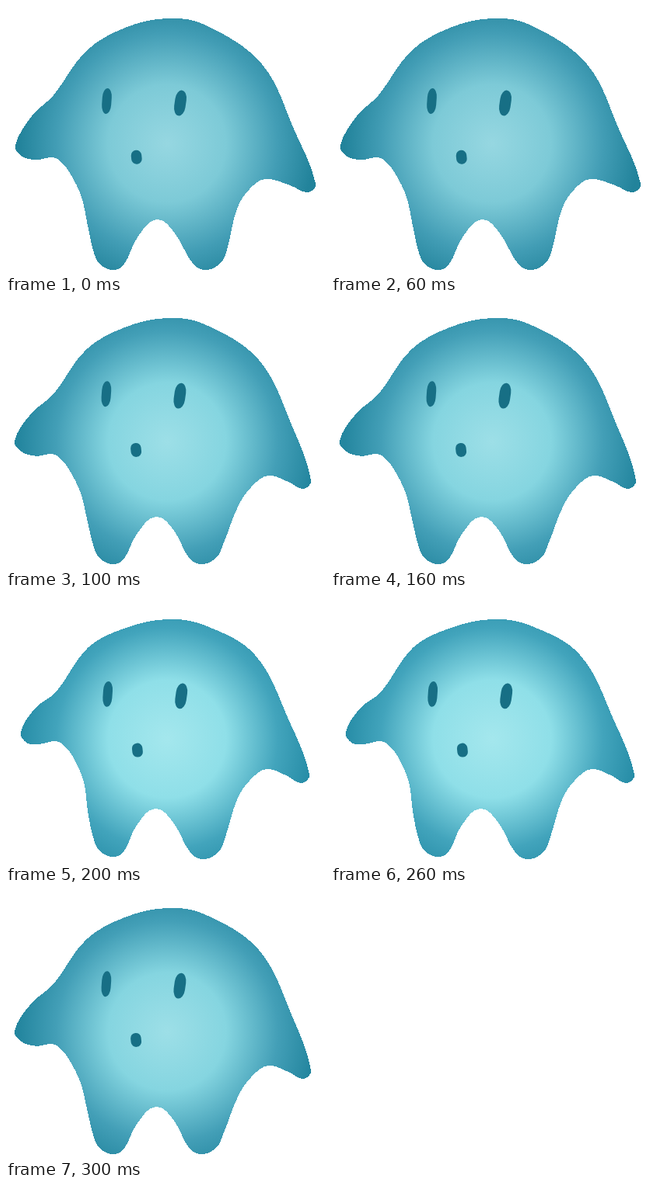
These frames come from a looping animation (410x344 px, 0.4 s). An HTML page:

```html
<!DOCTYPE html>
<html lang="en">
<head>
<meta charset="utf-8">
<title>Breathing blob</title>
<style>
  html, body { margin: 0; width: 100%; height: 100%; overflow: hidden; background: #fff; }
  svg { display: block; width: 410px; height: 344px; }
  .face { fill: #176f85; filter: blur(0.5px); }
</style>
</head>
<body>
<svg id="stage" viewBox="0 0 410 344"></svg>
<script>
const STEP = 100;
const ORDER = [0, 1, 2, 1];

// Key points of the resting body, clockwise from the top of the head.
const BODY = `207,16 255,24 329,75 371,161 398,229 388,240 365,231 333,223 313,236 297,261
  284,314 276,331 258,340 241,333 217,293 194,275 169,298 151,334 137,340 121,333 113,318
  105,283 97,246 82,215 70,200 60,195 40,198 21,194 12,180 33,142 61,115 103,58 153,28`
  .split(/\s+/).map(p => p.split(',').map(Number));

// Each joint pulls the outline near it; shift holds its offset per pose.
const joints = [
  { name: 'head',          at: [207, 16],  shift: [[0, 0], [0, 6], [0, 14]] },
  { name: 'rightShoulder', at: [350, 112], shift: [[0, 0], [-4, 1], [-9, 1]] },
  { name: 'rightHand',     at: [394, 236], shift: [[0, 0], [-6, 2], [-8, 1]] },
  { name: 'rightArmpit',   at: [333, 223], shift: [[0, 0], [4, 2], [2, 0]] },
  { name: 'rightFoot',     at: [258, 340], shift: [[0, 0], [-5, -1], [-3, -1]] },
  { name: 'crotch',        at: [194, 275], shift: [[0, 0], [-1, 3], [-2, -1]] },
  { name: 'leftFoot',      at: [137, 340], shift: [[0, 0], [0, -1], [0, -4]] },
  { name: 'leftArmpit',    at: [60, 195],  shift: [[0, 0], [-1, 2], [4, -8]] },
  { name: 'leftHand',      at: [12, 180],  shift: [[0, 0], [-1, 0], [7, -4]] },
  { name: 'leftShoulder',  at: [61, 115],  shift: [[0, 0], [0, 5], [3, 9]] }
];

const poses = [
  { face: [0, 0],       glowY: 177, skin: ['#96d7e1', '#7dcad7', '#429db5', '#22839b'] },
  { face: [-0.6, -2.8], glowY: 181, skin: ['#9ddfe7', '#85d5e0', '#439fb7', '#24869f'] },
  { face: [1.2, 3.9],   glowY: 184, skin: ['#a4e7ed', '#8fdfe8', '#42a4bc', '#268ca6'] }
];
const SKIN_STOPS = [0, 0.4, 0.75, 1];

// Moves a point by the joints' shifts, weighted by closeness.
function warp([x, y], pose) {
  let sum = 0, dx = 0, dy = 0;
  for (const { at, shift } of joints) {
    const weight = ((x - at[0]) ** 2 + (y - at[1]) ** 2 + 50) ** -2;
    sum += weight;
    dx += weight * shift[pose][0];
    dy += weight * shift[pose][1];
  }
  return [x + dx / sum, y + dy / sum];
}

// Closed spline: tangents follow the neighbours, handles scale with each span.
function smoothPath(pts) {
  const at = i => pts[(i + pts.length) % pts.length];
  const tangent = i => {
    const [a, b] = [at(i - 1), at(i + 1)];
    const length = Math.hypot(b[0] - a[0], b[1] - a[1]);
    return [(b[0] - a[0]) / length, (b[1] - a[1]) / length];
  };
  const handle = (i, reach) => at(i).map((v, k) => v + tangent(i)[k] * reach);
  const curves = pts.map((p, i) => {
    const next = at(i + 1);
    const reach = Math.hypot(next[0] - p[0], next[1] - p[1]) * 0.35;
    return `C${handle(i, reach)} ${handle(i + 1, -reach)} ${next}`;
  });
  return `M${pts[0]}${curves.join('')}Z`;
}

function pill(x, y, w, h, tilt) {
  return `<rect x="${x - w / 2}" y="${y - h / 2}" width="${w}" height="${h}"
    rx="${w / 2}" ry="${h * 0.36}" transform="rotate(${tilt} ${x} ${y})"/>`;
}

const FACE = pill(129.5, 122.5, 12, 33, 4) + pill(224, 125, 14.5, 33, 8)
  + pill(167.7, 194.7, 13.5, 18, -6);

function drawPose({ face, glowY, skin }, i) {
  const stops = skin.map((c, k) => `<stop offset="${SKIN_STOPS[k]}" stop-color="${c}"/>`);
  return `<g>
    <radialGradient id="skin${i}" gradientUnits="userSpaceOnUse"
      cx="207" cy="${glowY}" r="190">${stops.join('')}</radialGradient>
    <path d="${smoothPath(BODY.map(p => warp(p, i)))}" fill="url(#skin${i})"
      shape-rendering="crispEdges"/>
    <g class="face" transform="translate(${face})">${FACE}</g>
  </g>`;
}

const stage = document.getElementById('stage');
stage.innerHTML = poses.map(drawPose).join('');

[...stage.children].forEach((group, i) => {
  const frames = [...ORDER, ORDER[0]].map(pose => ({
    opacity: pose === i ? 1 : 0,
    easing: 'step-end'
  }));
  group.animate(frames, { duration: STEP * ORDER.length, iterations: Infinity });
});
</script>
</body>
</html>
```
